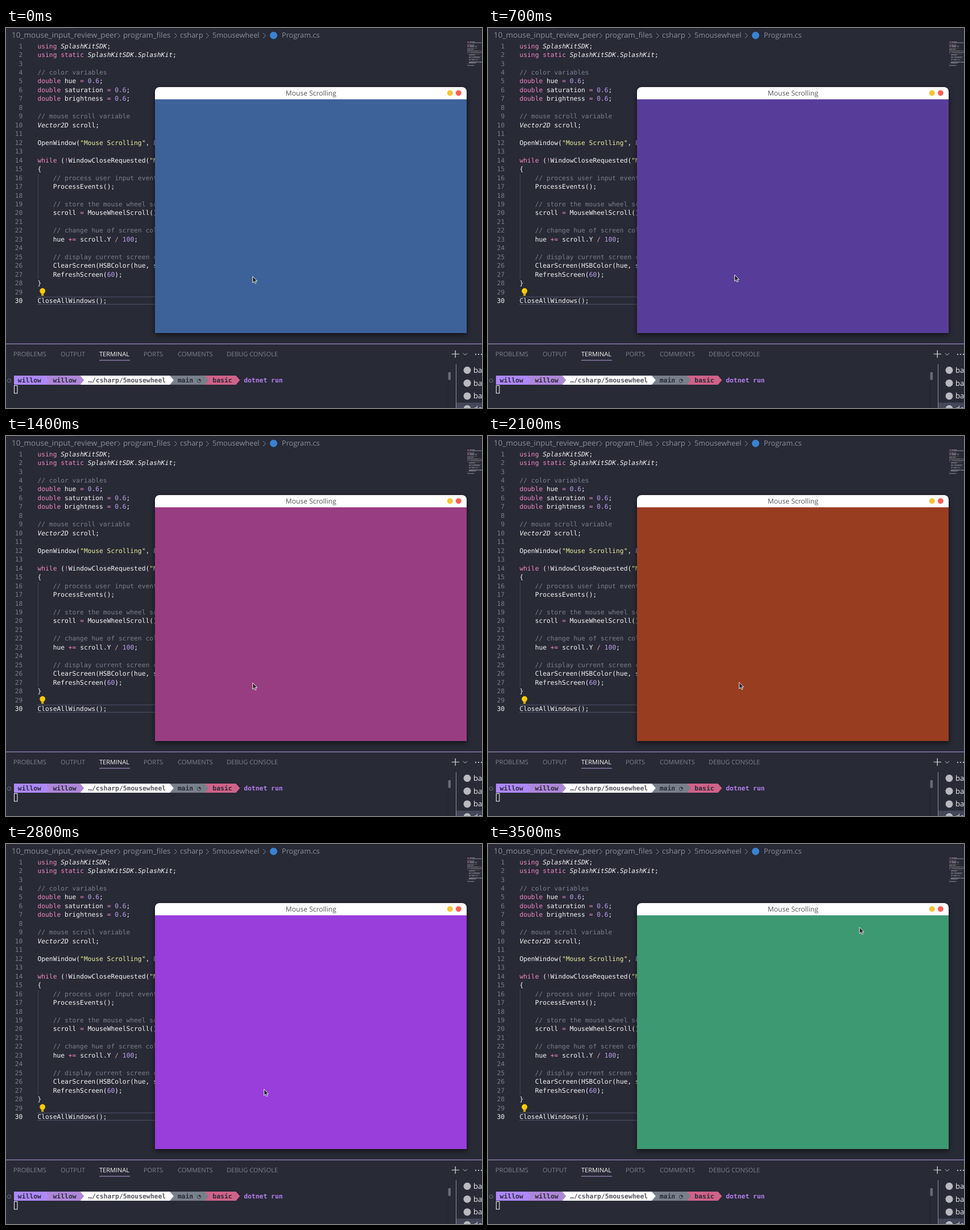
These frames come from a looping animation (837 px wide and 669 px high, 4200 ms). An HTML page:

```html
<!DOCTYPE html>
<html lang="en">
<head>
<meta charset="utf-8">
<title>Mouse Scrolling</title>
<style>
  html, body { margin: 0; width: 100%; height: 100%; overflow: hidden; background: #282a36; }
  svg { display: block; }
  text { white-space: pre; text-rendering: geometricPrecision; font-family: "Open Sans", sans-serif; }
  .mono { font-family: "DejaVu Sans Mono", monospace; font-size: 11.28px; fill: #f6f6f4; }
  .shell { font-size: 11.38px; font-weight: bold; }
  .comment { fill: #7b7f8b; }
  .keyword { fill: #f286c4; }
  .number { fill: #bf9eee; }
  .string { fill: #e7ee98; }
  .type { font-style: italic; }
</style>
</head>
<body>
<svg id="stage" width="837" height="669" viewBox="0 0 837 669"></svg>
<script>
const code = `using SplashKitSDK;
using static SplashKitSDK.SplashKit;

// color variables
double hue = 0.6;
double saturation = 0.6;
double brightness = 0.6;

// mouse scroll variable
Vector2D scroll;

OpenWindow("Mouse Scrolling", 800, 600);

while (!WindowCloseRequested("Mouse Scrolling"))
{
    // process user input events
    ProcessEvents();

    // store the mouse wheel scroll
    scroll = MouseWheelScroll();

    // change hue of screen color
    hue += scroll.Y / 100;

    // display current screen color
    ClearScreen(HSBColor(hue, saturation, brightness));
    RefreshScreen(60);
}

CloseAllWindows();`.split('\n');

const tokenRule = /(?<comment>\/\/.*)|(?<string>"[^"]*")|(?<keyword>\b(?:using|static|double|while)\b|[+!=\/]+)|(?<type>\b(?:SplashKitSDK|SplashKit|Vector2D)\b)|(?<number>\b\d[\d.]*)|\w+|\s+|./g;
const miniFill = { comment: '#7b7f8b', string: '#e7ee98', keyword: '#f286c4', number: '#bf9eee' };

const text = (x, y, str, size, fill, extra = '') =>
  `<text x="${x}" y="${y}" font-size="${size}" fill="${fill}" ${extra}>${str}</text>`;
const mono = (x, y, str, extra = '') => `<text class="mono" x="${x}" y="${y}" ${extra}>${str}</text>`;
const rect = (x, y, w, h, fill, extra = '') =>
  `<rect x="${x}" y="${y}" width="${w}" height="${h}" fill="${fill}" ${extra}/>`;
const dot = (x, y, r, fill, extra = '') => `<circle cx="${x}" cy="${y}" r="${r}" fill="${fill}" ${extra}/>`;
const path = (d, stroke, width = 1, fill = 'none') =>
  `<path d="${d}" stroke="${stroke}" stroke-width="${width}" fill="${fill}"/>`;

function breadcrumb() {
  const grey = '#8c8f9b';
  const parts = [[10, '10_mouse_input_review_peer', 13.5], [206, 'program_files', 13.1],
    [306, 'csharp', 12.9], [363, '5mousewheel', 12.7], [485, 'Program.cs', 12.7]];
  return rect(120, 0, 717, 1.5, '#1e2029')
    + parts.map(([x, str, size]) => text(x, 17, str, size, grey)).join('')
    + [196, 296, 352, 452].map(x => path(`M${x} 9l4.5 4.5l-4.5 4.5`, grey)).join('')
    + dot(470.5, 13, 6.5, '#3a82d0');
}

function editor() {
  let out = path('M55 473.5H800M55 486.5H800', '#44475a', 1.5) + path('M56.5 256V442', '#424556');
  code.forEach((line, row) => {
    const y = 35.6 + row * 15.466;
    let spans = '', col = 0;
    for (const { 0: str, groups } of line.matchAll(tokenRule)) {
      const kind = Object.keys(groups).find(k => groups[k]) || '';
      spans += `<tspan class="${kind}">${str}</tspan>`;
      if (str.trim()) {
        out += rect(811 + col * .7, 24 + row * 1.43, str.length * .7, 1, miniFill[kind] || '#f6f6f4', 'opacity=".5"');
      }
      col += str.length;
    }
    const fill = row === code.length - 1 ? '#f6f6f4' : '#7b7f8b';
    out += mono(29.3, y, row + 1, `text-anchor="end" style="fill:${fill}"`) + mono(55.5, y, spans);
  });
  const bulb = path('M62 468.5C62 466.5 59.3 466 59.3 463A4.9 4.9 0 0 1 69.1 463C69.1 466 66.4 466.5 66.4 468.5Z', 'none', 0, '#ffcc00')
    + rect(62, 469, 4.4, 2.2, '#ffcc00', 'rx="1"');
  return out + bulb;
}

function panel() {
  const tabs = [[13, 'PROBLEMS', 11.2], [96, 'OUTPUT', 10.9], [164, 'TERMINAL', 11],
    [242, 'PORTS', 11], [302, 'COMMENTS', 11], [388, 'DEBUG CONSOLE', 11]];
  let out = rect(0, 555.5, 837, 1.2, '#a08bc8') + rect(164, 584.5, 54, 1, '#b9a0d8');
  for (const [x, str, size] of tabs) {
    out += text(x, 578, str, size, str === 'TERMINAL' ? '#f6f6f4' : '#7f828e');
  }
  out += path('M783.5 574H797M790.2 567.5V580.5', '#e4e4e4', 1.2)
    + path('M804 572.5l3.5 3.5l3.5 -3.5', '#c4c4c8')
    + [826, 831, 836].map(x => dot(x, 574.5, 1.1, '#e4e4e4')).join('');

  out += path('M777.5 597V669', '#20222c') + rect(777.5, 606, 4.5, 13.5, '#686b78')
    + path('M791.5 592V669', '#8d8f9a') + rect(792, 659.5, 45, 10, '#44475a');
  ['bash', 'bash', 'bash', 'dotnet'].forEach((name, i) => {
    const y = 602.5 + i * 22.7;
    out += dot(811, y, 6.5, '#b9bac0') + text(822, y + 4.5, name, 13, '#eeeeec');
  });
  return out;
}

function prompt() {
  const cell = 6.85, left = 14, dark = '#282a36';
  const segments = [['willow', '#ae88ff', dark], ['willow', '#ae87d7', dark],
    ['…/csharp/5mousewheel', '#ffffff', '#55565c'], ['main ◔', '#78808b', dark], ['basic', '#cf6288', dark]];
  let shapes = '', labels = '', start = -1;
  for (const [str, fill, ink] of segments) {
    const end = start + str.length + 3;
    const x0 = left + Math.max(start, 0) * cell, x1 = left + end * cell;
    shapes = path(`M${x0} 612H${x1}l${cell} 8l${-cell} 8H${x0}Z`, 'none', 0, fill) + shapes;
    labels += mono(left + (start + 2) * cell, 623.8, str, `style="fill:${ink}" font-weight="bold"`).replace('mono', 'mono shell');
    start = end;
  }
  return shapes + labels
    + mono(left + (start + 2) * cell, 623.8, 'dotnet run', 'style="fill:#b57ff0"').replace('mono', 'mono shell')
    + dot(5.5, 620.8, 3, 'none', 'stroke="#777a86"')
    + rect(14.5, 629.5, 5.5, 13.5, 'none', 'stroke="#f6f6f4"');
}

function appWindow() {
  return `<g style="filter:drop-shadow(0 3px 5px #0009)">
    <path d="M262 537V112a8 8 0 0 1 8 -8H802a8 8 0 0 1 8 8V537Z" fill="#fff"/>
    <rect id="screen" x="262" y="125.5" width="548" height="411.5"/></g>`
    + text(536.3, 118.8, 'Mouse Scrolling', 12.1, '#55565a', 'text-anchor="middle"')
    + dot(780.8, 114.5, 5, '#f6c433') + dot(795.8, 114.5, 5, '#fb6058')
    + `<path id="pointer" d="M0 0V11.3L2.6 8.9L4.3 12.7L6.3 11.8L4.6 8.2H8Z" fill="#24242a" stroke="#eee" stroke-width="1" stroke-linejoin="round"/>`;
}

document.getElementById('stage').innerHTML = breadcrumb() + editor() + panel() + prompt() + appWindow();

const hold = 700;
const poses = [
  ['#3d6299', 433.7, 437.2],
  ['#573d99', 433.7, 434.5],
  ['#993d82', 433.7, 434.5],
  ['#993d21', 441.7, 433.7],
  ['#993ddb', 453.7, 431.7],
  ['#3d9972', 653.2, 146.5],
];
const screenArea = document.getElementById('screen');
const pointer = document.getElementById('pointer');

function draw() {
  const [fill, x, y] = poses[Math.floor(performance.now() / hold) % poses.length];
  screenArea.setAttribute('fill', fill);
  pointer.setAttribute('transform', `translate(${x} ${y})`);
  requestAnimationFrame(draw);
}
draw();
</script>
</body>
</html>
```
